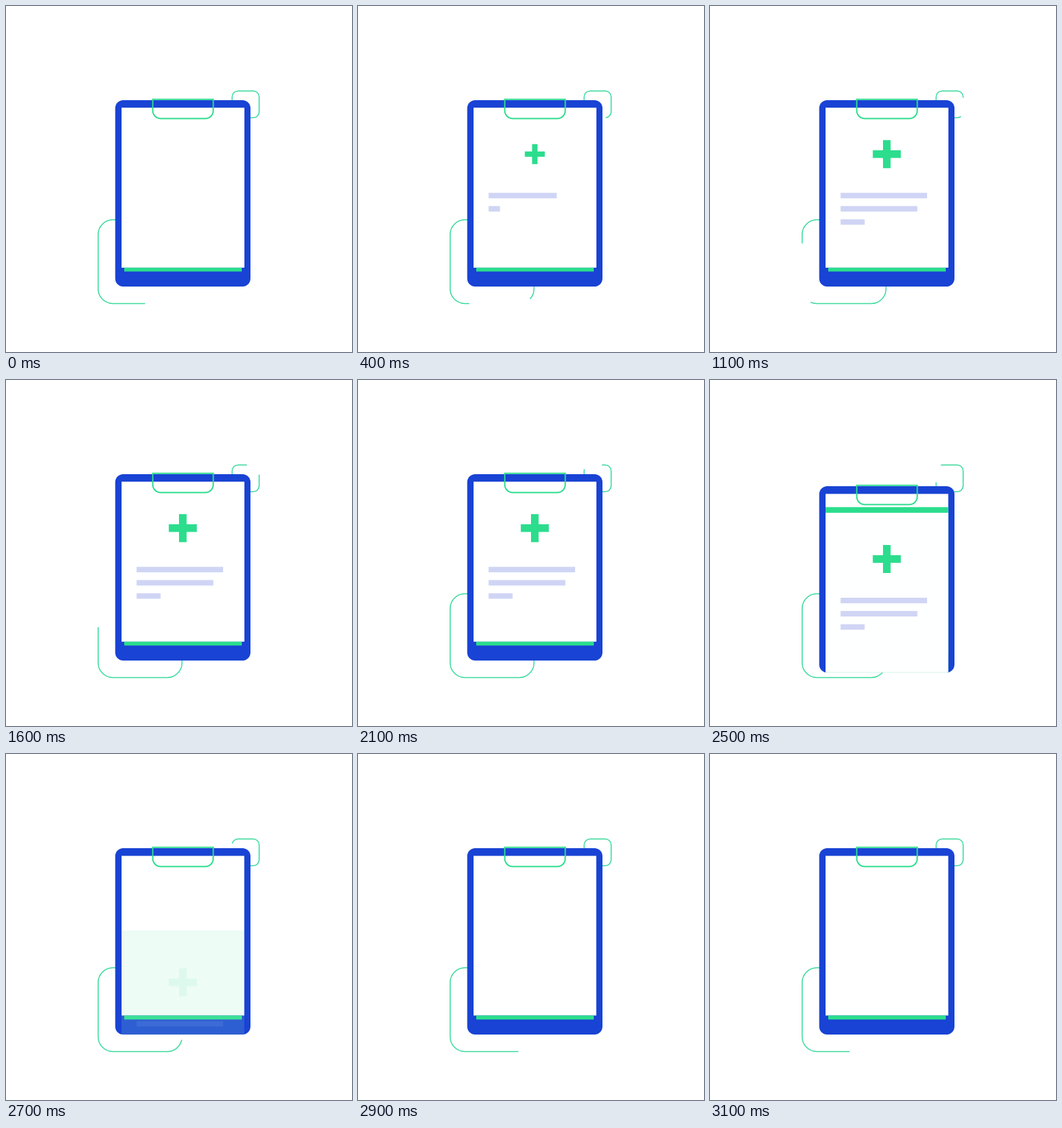
These frames come from a looping animation (518 by 518 pixels, 3200 ms). An HTML page:

```html
<!DOCTYPE html>
<html lang="en">
<head>
<meta charset="utf-8">
<title>Clipboard</title>
<style>
  html, body { margin: 0; width: 100%; height: 100%; overflow: hidden; background: #fff; }
  svg { display: block; width: 100%; height: 100%; }
  .outline { fill: none; stroke: #36d99a; stroke-width: 1.5; stroke-dasharray: .8 .2; }
  .blue { fill: #1943d4; }
  .green { fill: #2bdd8d; }
  .white { fill: #fff; }
  .line { fill: #d0d5f5; }
</style>
</head>
<body>
<svg viewBox="0 0 518 518">
  <clipPath id="boardShape"><rect x="163.5" y="141" width="202.5" height="279" rx="12"/></clipPath>

  <!-- large outline runs clockwise, small one counterclockwise -->
  <path id="large" class="outline" pathLength="1"
    d="M263.5 342V423.5A22 22 0 0 1 241.5 445.5H160A22 22 0 0 1 138 423.5V342A22 22 0 0 1 160 320H241.5A22 22 0 0 1 263.5 342Z"/>
  <path id="small" class="outline" pathLength="1"
    d="M347.5 167.3H370A9 9 0 0 0 379 158.3V136.2A9 9 0 0 0 370 127.2H347.5A9 9 0 0 0 338.5 136.2V158.3A9 9 0 0 0 347.5 167.3Z"/>

  <g id="board">
    <rect class="blue" x="163.5" y="141" width="202.5" height="279" rx="12"/>
    <rect class="white" x="173" y="152.5" width="183.7" height="239"/>
    <rect class="green" x="177" y="391.5" width="176" height="6"/>
    <g clip-path="url(#boardShape)">
      <g id="sheet">
        <rect id="backing" class="green" x="173" width="183.7"/>
        <rect id="paper" class="white" x="173" y="152.5" width="183.7" height="239"/>
        <path id="plus" class="green" d="M-5.7 -21H5.7V-5.7H21V5.7H5.7V21H-5.7V5.7H-21V-5.7H-5.7Z"/>
        <rect class="line" x="195.5" y="279.7" height="8.2"/>
        <rect class="line" x="195.5" y="299.5" height="8.2"/>
        <rect class="line" x="195.5" y="319.3" height="8.2"/>
      </g>
    </g>
    <path d="M219.7 139.8H310.3V156.5A12 12 0 0 1 298.3 168.5H231.7A12 12 0 0 1 219.7 156.5Z"
      fill="none" stroke="#2bdd8d" stroke-width="2"/>
  </g>
</svg>
<script>
const LOOP = 3200;
const LAP = 2970;
const EXIT = 2300;
const lineWidths = [129.5, 115, 36];

const el = id => document.getElementById(id);
const set = (node, attrs) => {
  for (const key in attrs) node.setAttribute(key, attrs[key]);
};
const clamp = x => Math.min(1, Math.max(0, x));
const ramp = (t, start, length) => clamp((t - start) / length);
const smooth = x => x * x * (3 - 2 * x);

const [large, small, board, sheet, backing, paper, plus] =
  ['large', 'small', 'board', 'sheet', 'backing', 'paper', 'plus'].map(el);
const lines = [...document.querySelectorAll('.line')];

function draw(t) {
  // the outlines rest briefly at the start of the loop
  const lap = (Math.max(135, t) - 400) / LAP;
  set(large, { 'stroke-dashoffset': -(lap + .411) });
  set(small, { 'stroke-dashoffset': -(lap + .1604) });

  const dip = 18 * Math.sin(Math.PI * ramp(t, EXIT, 400));
  const slide = 46 * Math.pow(Math.max(0, t - EXIT) / 200, 1.38) - dip;
  const alpha = 1 - ramp(t, 2500, 220);
  const strip = Math.max(0, Math.min(8.5, slide * .304));

  set(board, { transform: `translate(0 ${dip})` });
  set(sheet, {
    transform: `translate(0 ${slide})`,
    visibility: alpha > 0 ? 'visible' : 'hidden'
  });
  set(backing, { y: 152.5 - strip, height: strip + 239, opacity: t > EXIT ? alpha : 0 });
  set(paper, { opacity: alpha });
  set(plus, {
    transform: `translate(264.7 221.7) scale(${smooth(ramp(t, 175, 350))})`,
    opacity: alpha
  });
  lines.forEach((line, i) => set(line, {
    width: lineWidths[i] * smooth(ramp(t, 155 + i * 161, 350)),
    opacity: alpha
  }));
}

const start = performance.now();
function tick() {
  draw((performance.now() - start) % LOOP);
  requestAnimationFrame(tick);
}
tick();
</script>
</body>
</html>
```
